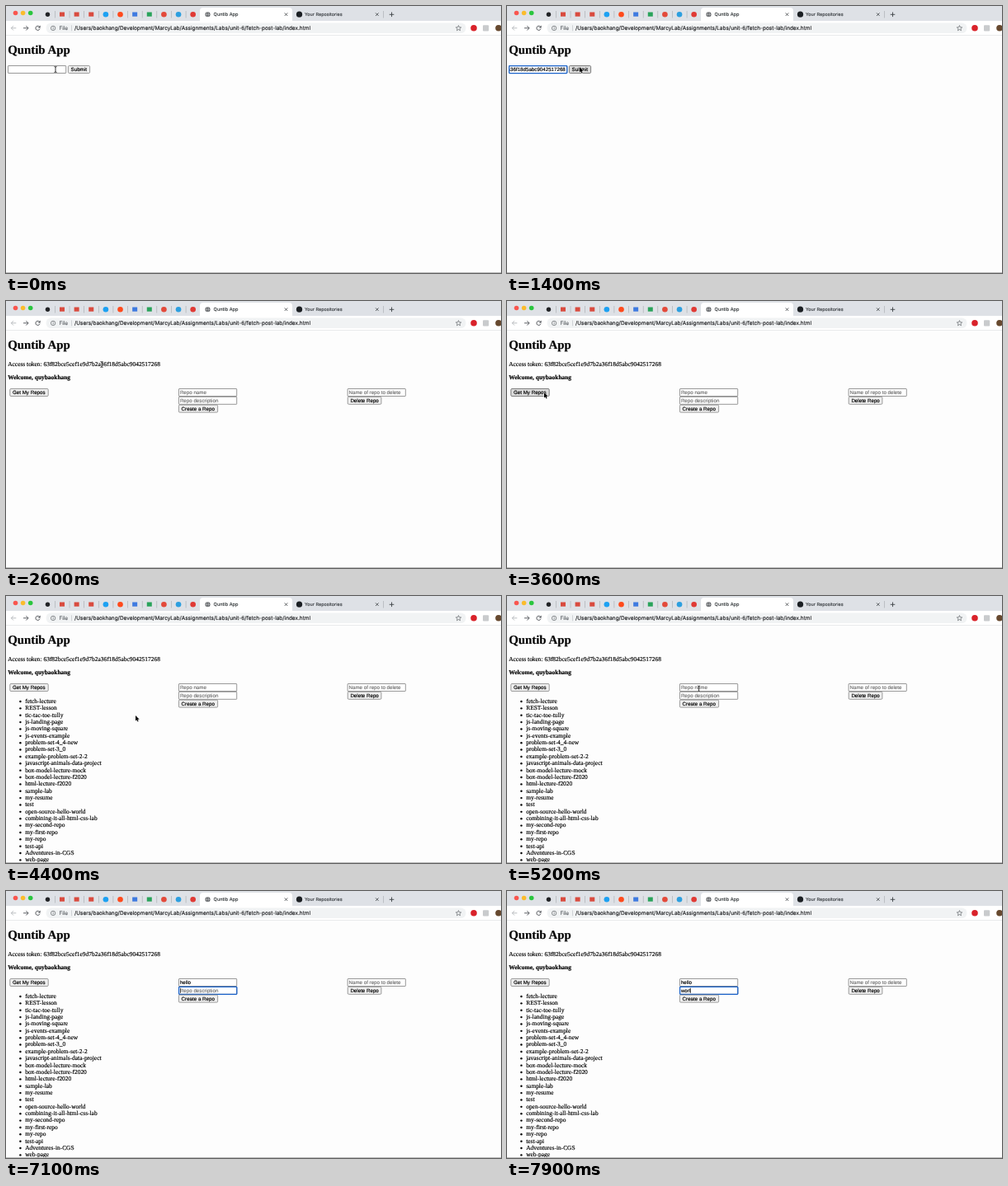
An HTML page with a canvas that plays this animation: 600x324 px, repeating every 8 s.

```html
<!DOCTYPE html>
<html lang="en">
<head>
<meta charset="utf-8">
<title>Quntib App</title>
<style>
html, body { margin: 0; width: 100%; height: 100%; overflow: hidden; background: #fdfdfd; }
canvas { display: block; width: 600px; height: 324px; }
</style>
</head>
<body>
<canvas id="stage"></canvas>
<script>
const W = 600, H = 324, LOOP = 8000, STEP = 100;
const canvas = document.getElementById('stage');
const ctx = canvas.getContext('2d');
const dpr = window.devicePixelRatio || 1;
canvas.width = W * dpr;
canvas.height = H * dpr;

const UI = 'Inter, Roboto, sans-serif';
const SERIF = '"Liberation Serif", "Times New Roman", serif';
const SANS = '"Liberation Sans", Arial, sans-serif';
const TOKEN = '63f82bce5cef1e9d7b2a36f18d5abc9042517268';
const REPOS = ['fetch-lecture', 'REST-lesson', 'tic-tac-toe-tully', 'js-landing-page',
  'js-moving-square', 'js-events-example', 'problem-set-4_4-new', 'problem-set-3_0',
  'example-problem-set-2-2', 'javascript-animals-data-project', 'box-model-lecture-mock',
  'box-model-lecture-f2020', 'html-lecture-f2020', 'sample-lab', 'my-resume', 'test',
  'open-source-hello-world', 'combining-it-all-html-css-lab', 'my-second-repo',
  'my-first-repo', 'my-repo', 'test-api', 'Adventures-in-CGS', 'web-page'];

// Pointer path: time, x, y
const PATH = [[0, 60, 77], [700, 60, 77], [1300, 88, 74], [1800, 88, 74], [2600, 116, 77],
  [2700, 116, 77], [3400, 45, 111], [3900, 45, 111], [4400, 157, 145], [4500, 157, 145],
  [5300, 236, 111], [LOOP, 236, 111]];
const NAME_KEYS = [5800, 6000, 6100, 6300, 6400];
const DESC_KEYS = [7300, 7500, 7700, 7900];

// A hairline outline gives small type its darker desktop weight
function text(s, x, y, font, color = '#000') {
  ctx.font = font;
  ctx.fillStyle = ctx.strokeStyle = color;
  ctx.lineWidth = 0.16;
  ctx.fillText(s, x, y);
  ctx.strokeText(s, x, y);
}

function rect(x, y, w, h, color) {
  ctx.fillStyle = color;
  ctx.fillRect(x, y, w, h);
}

function round(x, y, w, h, r, fill, stroke, width = 0.7) {
  ctx.beginPath();
  ctx.roundRect(x, y, w, h, r);
  if (fill) { ctx.fillStyle = fill; ctx.fill(); }
  if (stroke) { ctx.strokeStyle = stroke; ctx.lineWidth = width; ctx.stroke(); }
}

function dot(x, y, r, color) {
  ctx.beginPath();
  ctx.arc(x, y, r, 0, Math.PI * 2);
  ctx.fillStyle = color;
  ctx.fill();
}

function lines(color, width, ...paths) {
  ctx.strokeStyle = color;
  ctx.lineWidth = width;
  ctx.beginPath();
  for (const p of paths) {
    for (let i = 0; i < p.length; i += 2) ctx[i ? 'lineTo' : 'moveTo'](p[i], p[i + 1]);
  }
  ctx.stroke();
}

function cross(x, y) {
  lines('#3c4043', 0.8, [x - 1.8, y - 1.8, x + 1.8, y + 1.8], [x + 1.8, y - 1.8, x - 1.8, y + 1.8]);
}

function globe(x, y) {
  dot(x, y, 3, '#4a4d51');
  ctx.strokeStyle = '#fff';
  ctx.lineWidth = 0.5;
  ctx.beginPath();
  ctx.ellipse(x, y, 1.3, 2.9, 0, 0, Math.PI * 2);
  ctx.stroke();
  lines('#fff', 0.5, [x - 2.8, y, x + 2.8, y]);
}

function star(x, y) {
  const p = [];
  for (let i = 0; i <= 10; i++) {
    const a = -Math.PI / 2 + i * Math.PI / 5, r = i % 2 ? 1.5 : 3.4;
    p.push(x + r * Math.cos(a), y + r * Math.sin(a));
  }
  lines('#5f6368', 0.7, p);
}

function tabStrip() {
  rect(0, 0, W, 18, '#dee1e6');
  ['#f9564f', '#fbbc2d', '#2bc63f'].forEach((c, i) => dot(11.5 + i * 9.1, 8.5, 2.8, c));
  dot(50.5, 10.3, 2.7, '#222427');
  const icons = ['#d94b3f', '#d94b3f', '#d94b3f', '#1da1f2', '#ff4a1c', '#3f7be0', '#2aa35b', '#e34a3b', '#2d9fdf', '#e03a35'];
  const square = [0, 1, 2, 5, 6];
  icons.forEach((c, i) => {
    const x = 68 + i * 17.63;
    rect(x - 8.9, 6, 0.6, 8.5, '#a5a9ae');
    if (square.includes(i)) rect(x - 3, 7.5, 6, 5.2, c);
    else dot(x, 10.2, 3.3, c);
  });
  round(235, 2, 112, 20, 4, '#fff');
  globe(244.5, 10.2);
  text('Quntib App', 251.6, 12.2, '5.6px ' + UI, '#3c4043');
  cross(339.5, 10.2);
  dot(355.5, 10.2, 3.6, '#1b1f23');
  text('Your Repositories', 362, 12.2, '5.5px ' + UI, '#3f4347');
  cross(449.8, 10.2);
  rect(457, 6, 0.6, 8.5, '#a5a9ae');
  lines('#3c4043', 0.9, [464.7, 10.3, 470.3, 10.3], [467.5, 7.5, 467.5, 13.1]);
}

function arrow(x, y, dir, color) {
  lines(color, 0.9, [x - 3, y, x + 3, y], [x + dir * 0.3, y - 2.7, x + dir * 3, y, x + dir * 0.3, y + 2.7]);
}

function toolbar() {
  rect(0, 18, W, 17.5, '#fff');
  arrow(9.3, 26.8, -1, '#b4b7ba');
  arrow(24, 26.8, 1, '#4d5156');
  ctx.strokeStyle = '#4d5156';
  ctx.lineWidth = 0.9;
  ctx.beginPath();
  ctx.arc(38.5, 26.8, 2.6, 0.3, Math.PI * 1.75);
  ctx.stroke();
  ctx.fillStyle = '#4d5156';
  ctx.beginPath();
  ctx.moveTo(41.6, 23.4);
  ctx.lineTo(41.6, 26.4);
  ctx.lineTo(38.7, 26.4);
  ctx.fill();
  round(48.5, 20.5, 509, 12.6, 6.3, '#f1f3f4');
  round(54.4, 24.2, 5.4, 5.4, 2.7, null, '#5f6368');
  rect(56.8, 26.4, 0.7, 1.9, '#5f6368');
  rect(56.8, 25.3, 0.7, 0.7, '#5f6368');
  text('File', 64.5, 29, '6.4px ' + UI, '#5f6368');
  rect(79, 23.3, 0.6, 7, '#b9bcc0');
  text('/Users/baokhang/Development/MarcyLab/Assignments/Labs/unit-6/fetch-post-lab/index.html',
    83, 29, '6.44px ' + UI, '#202124');
  star(548.5, 27);
  dot(567, 26.7, 3.8, '#d9222a');
  round(578, 23.2, 7.2, 7.2, 1, '#c9cbcd');
  dot(597, 26.8, 3.8, '#67492f');
  rect(0, 35, W, 0.6, '#dcdee0');
}

function button(label, x, y, w, state) {
  const fill = { hover: '#dcdcdc', active: '#f5f5f5' }[state] || '#efefef';
  round(x + 0.4, y + 0.5, w - 0.8, 9, 1.2, fill, state === 'hover' ? '#4f4f4f' : '#767676');
  text(label, x + 3.6, y + 7.1, '6.2px ' + SANS);
}

function field(x, y, value, hint, focus, caret) {
  const w = 71;
  round(x + 0.5, y + 0.5, w - 0.8, 9, 0.5, '#fff', '#6e6e6e');
  if (focus) round(x + 0.6, y + 0.6, w - 0.8, 9, 0.8, null, '#1a62c9', 1.3);
  ctx.save();
  ctx.beginPath();
  ctx.rect(x + 1.5, y + 1, w - 3, 8);
  ctx.clip();
  ctx.font = '6.2px ' + SANS;
  const width = ctx.measureText(value).width;
  const left = x + Math.min(1.9, w - 2.2 - width);
  text(value || hint, left, y + 7.1, ctx.font, value ? '#000' : '#757575');
  if (focus && caret) rect(left + width + 0.1, y + 1.9, 0.6, 6.2, '#000');
  ctx.restore();
}

function pointer(x, y, beam) {
  if (beam) {
    const shape = [[x, y - 3, x, y + 3], [x - 1.5, y - 3.5, x, y - 3, x + 1.5, y - 3.5],
      [x - 1.5, y + 3.5, x, y + 3, x + 1.5, y + 3.5]];
    lines('#fff', 1.6, ...shape);
    lines('#000', 0.8, ...shape);
    return;
  }
  const p = [0, 0, 0, 6.6, 1.5, 5.2, 2.5, 7.6, 3.6, 7.1, 2.6, 4.8, 4.7, 4.8];
  ctx.beginPath();
  for (let i = 0; i < p.length; i += 2) ctx.lineTo(x + p[i], y + p[i + 1]);
  ctx.closePath();
  ctx.strokeStyle = '#fff';
  ctx.lineWidth = 1;
  ctx.stroke();
  ctx.fillStyle = '#000';
  ctx.fill();
}

function pointerAt(t) {
  const i = PATH.findIndex(p => p[0] > t);
  const [t0, x0, y0] = PATH[i - 1], [t1, x1, y1] = PATH[i];
  const k = (t - t0) / (t1 - t0), e = k * k * (3 - 2 * k);
  return [x0 + (x1 - x0) * e, y0 + (y1 - y0) * e];
}

const within = (x, y, l, t, r, b) => x >= l && x <= r && y >= t && y <= b;
const typed = (word, keys, t) => word.slice(0, keys.filter(k => k <= t).length);

function loginForm(t, x, y) {
  const focus = t >= 100 && t < 1500;
  field(2, 72, t >= 600 ? TOKEN : '', '', focus, t >= 200 && t < 1300);
  const over = within(x, y, 75, 72, 102, 82);
  button('Submit', 75, 72, 27, t === 1500 ? 'active' : over ? 'hover' : '');
}

function dashboard(t, x, y) {
  text('Access token: ' + TOKEN, 2.2, 78.9, '7.43px ' + SERIF);
  text('Welcome, quybaokhang', 2.2, 94.7, 'bold 7.43px ' + SERIF);
  const over = within(x, y, 4, 106, 52, 116);
  button('Get My Repos', 4.4, 106, 47.2, t === 3700 ? 'active' : over ? 'hover' : '');
  field(209, 106, typed('hello', NAME_KEYS, t), 'Repo name', t >= 5400 && t < 6700, t >= 5500);
  field(209, 115.8, typed('worl', DESC_KEYS, t), 'Repo description', t >= 6700, true);
  button('Create a Repo', 209, 125.6, 48);
  field(413.6, 106, '', 'Name of repo to delete');
  button('Delete Repo', 413.8, 115.8, 41.5);
  if (t < 3900) return;
  REPOS.forEach((name, i) => {
    const base = 129.9 + i * 8.366;
    dot(17.4, base - 1.9, 1.2, '#000');
    text(name, 23.2, base, '7.43px ' + SERIF);
  });
}

function draw(t) {
  ctx.setTransform(dpr, 0, 0, dpr, 0, 0);
  ctx.textRendering = 'geometricPrecision';
  rect(0, 0, W, H, '#fdfdfd');
  tabStrip();
  toolbar();
  text('Quntib App', 2.2, 58.4, 'bold 14.87px ' + SERIF);
  const [x, y] = pointerAt(t);
  const login = t < 1800;
  (login ? loginForm : dashboard)(t, x, y);
  rect(0, 323, W, 1, '#bdbdbd');
  const beam = login ? within(x, y, 2, 72, 74, 82)
    : within(x, y, 2, 72, 187, 81) || within(x, y, 209, 106, 280, 125);
  if (t < NAME_KEYS[0]) pointer(x, y, beam);
}

const start = performance.now();
function frame(now) {
  const t = Math.max(0, now - start) % LOOP;
  draw(Math.floor(t / STEP) * STEP);
  requestAnimationFrame(frame);
}
draw(0);
requestAnimationFrame(frame);
</script>
</body>
</html>
```
